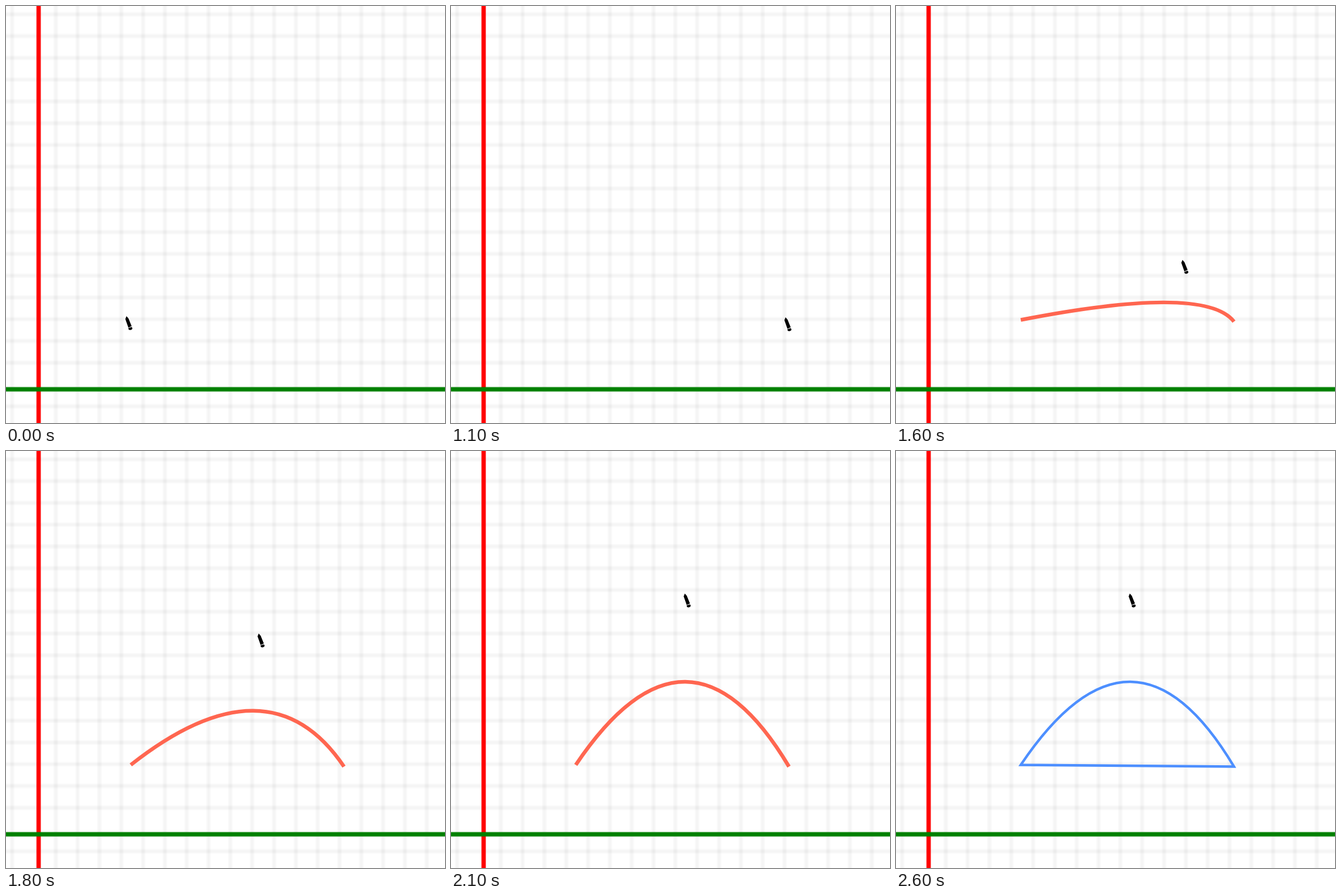
These frames come from a looping animation (767 px wide and 730 px high, 3.37 s). An HTML page with a canvas:

```html
<!DOCTYPE html>
<html lang="en">
<head>
<meta charset="utf-8">
<title>Arc sketch</title>
<style>
html, body { margin: 0; width: 100%; height: 100%; overflow: hidden; background: #fff; }
canvas { display: block; }
</style>
</head>
<body>
<canvas id="stage" width="767" height="730"></canvas>
<script>
const W = 767, H = 730, LOOP = 3370, STEP = 100;
const ctx = document.getElementById('stage').getContext('2d');

const start = { x: 218, y: 549.5 };
const end = { x: 590.5, y: 552.5 };
const hotspot = { x: 7.5, y: 7.5 };

// Pen tip by time: [ms, x, y]
const penPath = [
  [700, 209, 543], [800, 254, 543], [900, 396, 544], [1000, 538, 545], [1100, 583, 545],
  [1300, 583, 545], [1400, 581, 541], [1500, 566, 514], [1600, 499, 444.5],
  [1700, 465, 382.5], [1800, 440, 319.5], [1900, 418, 275], [2000, 407, 249.5]
];

function penAt(time) {
  if (time <= penPath[0][0]) return { x: penPath[0][1], y: penPath[0][2] };
  for (let i = 1; i < penPath.length; i++) {
    const [t0, x0, y0] = penPath[i - 1];
    const [t1, x1, y1] = penPath[i];
    if (time <= t1) {
      const k = (time - t0) / (t1 - t0);
      return { x: x0 + (x1 - x0) * k, y: y0 + (y1 - y0) * k };
    }
  }
  const last = penPath[penPath.length - 1];
  return { x: last[1], y: last[2] };
}

// The curve trails the pen by half a step.
function controlAt(time) {
  const pen = penAt(time - STEP / 2);
  return { x: pen.x + hotspot.x, y: pen.y + hotspot.y };
}

function softBar(center, vertical, size, color) {
  ctx.fillStyle = color;
  if (vertical) ctx.fillRect(center - size / 2, 0, size, H);
  else ctx.fillRect(0, center - size / 2, W, size);
}

function drawGrid() {
  const pitch = 38.13;
  const lines = (first, count, skipped, vertical) => {
    for (let i = 0; i < count; i++) {
      if (i === skipped) continue;
      for (const size of [8.5, 4.5]) {
        softBar(first + i * pitch, vertical, size, 'rgba(0,0,0,0.019)');
      }
    }
  };
  lines(10.7, 20, 1, true);
  lines(14.5, 19, 17, false);
}

function drawAxes() {
  softBar(57, true, 8.4, 'rgba(255,0,0,0.4)');
  softBar(57, true, 7, '#f00');
  softBar(671, false, 8.8, 'rgba(0,128,0,0.4)');
  softBar(671, false, 7, '#008000');
}

function drawArc(control, color, width, closed) {
  ctx.beginPath();
  ctx.moveTo(start.x, start.y);
  ctx.quadraticCurveTo(control.x, control.y, end.x, end.y);
  if (closed) ctx.closePath();
  ctx.strokeStyle = color;
  ctx.lineWidth = width;
  ctx.lineJoin = 'miter';
  ctx.stroke();
}

function drawPen({ x, y }) {
  ctx.save();
  ctx.translate(x, y);
  ctx.fillStyle = '#000';
  ctx.beginPath();
  ctx.moveTo(1.5, 0);
  ctx.lineTo(5, 4);
  ctx.lineTo(10.5, 17.5);
  ctx.lineTo(4.8, 20);
  ctx.lineTo(-0.5, 5);
  ctx.closePath();
  ctx.fill();
  ctx.beginPath();
  ctx.ellipse(8.3, 21.5, 3.5, 2.6, -0.3, 0, Math.PI * 2);
  ctx.fill();
  ctx.strokeStyle = '#fff';
  ctx.lineWidth = 0.9;
  ctx.beginPath();
  ctx.moveTo(5.8, 20.2);
  ctx.lineTo(10, 18.6);
  ctx.stroke();
  ctx.restore();
}

function render(now) {
  const time = Math.floor((now % LOOP) / STEP) * STEP;
  ctx.fillStyle = '#fff';
  ctx.fillRect(0, 0, W, H);
  drawGrid();
  drawAxes();
  const control = controlAt(time);
  if (time >= 1400 && time < 2600) drawArc(control, '#ff6650', 6.6, false);
  if (time >= 2500) drawArc(control, '#4d8fff', 4.4, true);
  drawPen(penAt(time));
}

const began = performance.now();
function tick() {
  render(performance.now() - began);
  requestAnimationFrame(tick);
}
tick();
</script>
</body>
</html>
```
